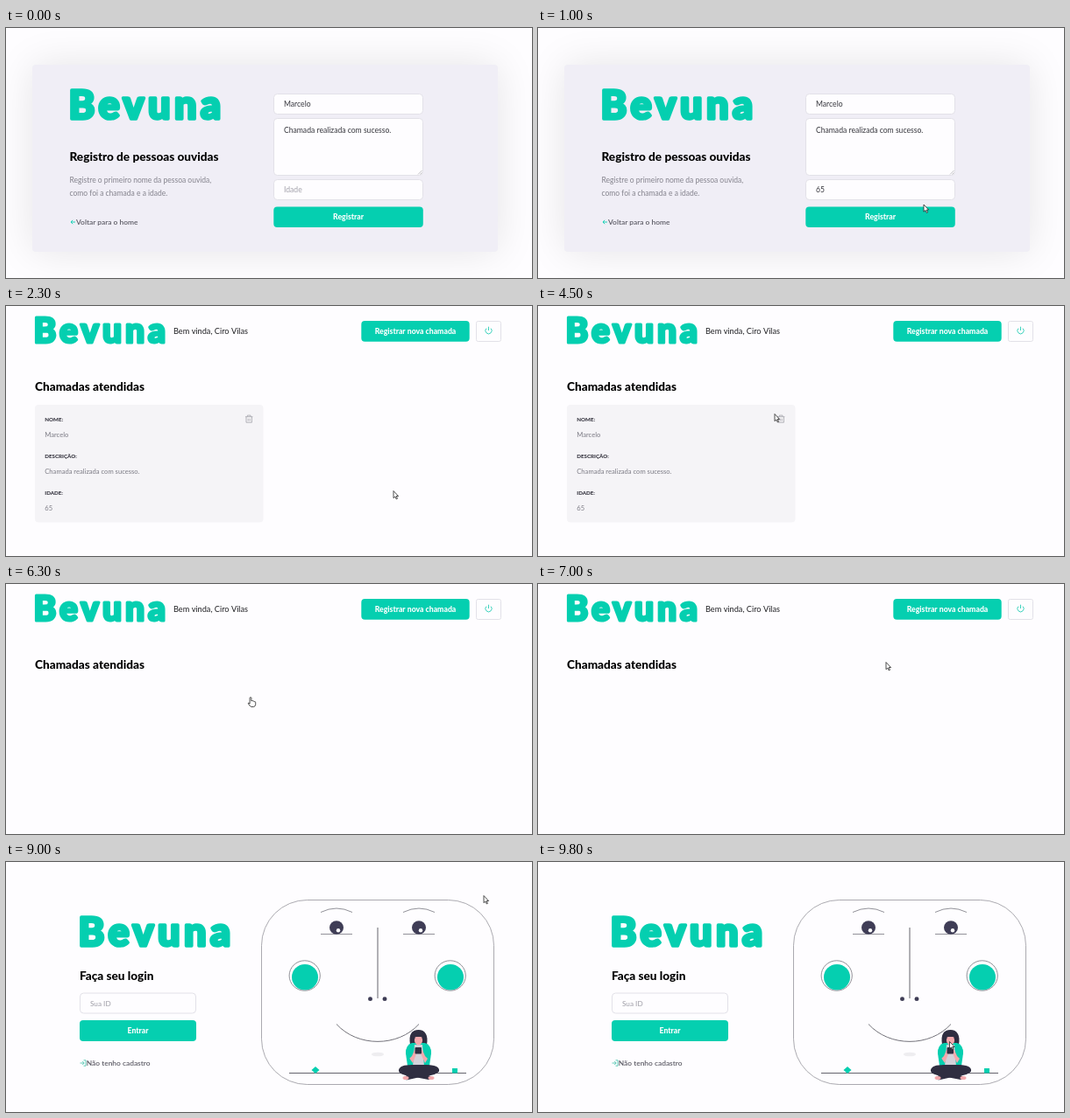
Write an HTML page with a canvas that moves like this. It is 600x286 px and loops after 10 s.

```html
<!DOCTYPE html>
<html lang="pt">
<head>
<meta charset="utf-8">
<title>Registro de chamadas</title>
<style>
  html, body { margin: 0; width: 100%; height: 100%; overflow: hidden; background: #fefdff; }
  canvas { display: block; width: 600px; height: 286px; }
</style>
</head>
<body>
<canvas id="stage"></canvas>
<script>
const W = 600, H = 286, LOOP = 10000;
const GREEN = '#05cfb0', HOVER = '#09b59d', INK = '#000', LINE = '#e2e1e8';
const BRAND = 'Bevuna', PERSON = 'Marcelo', USER = 'Ciro Vilas';
const NOTE = 'Chamada realizada com sucesso.';

const canvas = document.getElementById('stage');
const ctx = canvas.getContext('2d');
const scale = window.devicePixelRatio || 1;
canvas.width = W * scale;
canvas.height = H * scale;

// Pointer stops: [time, x, y, shape]; a missing shape hides it.
const pointer = [
  [0, 0, 0, ''],
  [1000, 440, 202, 'arrow'], [1300, 442, 210, 'arrow'], [1500, 442, 211.5, 'arrow'],
  [2800, 454.5, 119, 'arrow'], [3300, 454.5, 104, 'arrow'], [3500, 454.5, 89.5, 'arrow'],
  [4000, 301.5, 89.5, 'arrow'], [4300, 280, 112, 'arrow'], [4500, 270, 123.5, 'arrow'],
  [4800, 273, 126, 'arrow'], [5000, 279, 129.5, 'hand'],
  [7000, 397, 89.5, 'arrow'], [7300, 424, 84, 'arrow'], [7500, 451.5, 72.5, 'arrow'],
  [7800, 507, 50, 'arrow'], [8000, 546.5, 38.5, 'hand'],
  [9000, 545, 38.5, 'arrow'], [9300, 484, 170, 'arrow'], [9500, 469.5, 205.5, 'arrow']
];

const stepAt = (list, t) => list.filter(s => s[0] <= t).pop();

function text(str, x, y, size, color, weight = 400, align = 'left') {
  ctx.font = `${weight} ${size}px Lato, sans-serif`;
  ctx.textAlign = align;
  ctx.fillStyle = color;
  ctx.fillText(str, x, y);
}

function box(x, y, w, h, r, fill, stroke) {
  ctx.beginPath();
  ctx.roundRect(x, y, w, h, r);
  paint(fill, stroke, 1);
}

function paint(fill, stroke, width = 0.8) {
  if (fill) { ctx.fillStyle = fill; ctx.fill(); }
  if (stroke) { ctx.strokeStyle = stroke; ctx.lineWidth = width; ctx.stroke(); }
}

function shape(d, fill, stroke, width) {
  const path = new Path2D(d);
  if (fill) { ctx.fillStyle = fill; ctx.fill(path); }
  if (stroke) { ctx.strokeStyle = stroke; ctx.lineWidth = width || 0.8; ctx.stroke(path); }
}

function oval(x, y, rx, ry, fill, stroke) {
  ctx.beginPath();
  ctx.ellipse(x, y, rx, ry, 0, 0, Math.PI * 2);
  paint(fill, stroke);
}

// The outline rounds the corners of the heavy letters.
function wordmark(x, y, size) {
  ctx.save();
  ctx.letterSpacing = `${size * 0.1}px`;
  text(BRAND, x, y, size, GREEN, 800);
  ctx.strokeStyle = GREEN;
  ctx.lineWidth = size * 0.08;
  ctx.strokeText(BRAND, x, y);
  ctx.restore();
}

function field(x, y, w, h) {
  box(x + 0.5, y + 0.5, w - 1, h - 1, 4, '#fefdff', LINE);
}

function button(label, x, y, w, h, color = GREEN) {
  box(x, y, w, h, 4, color);
  text(label, x + w / 2, y + h / 2 + 3.2, 8.7, '#fff', 800, 'center');
}

function formPage(t) {
  ctx.save();
  ctx.shadowColor = 'rgba(0,0,0,0.1)';
  ctx.shadowBlur = 46 * scale;
  box(30, 42, 531, 214, 4, '#f0eef6');
  ctx.restore();

  wordmark(71.4, 104.2, 45);
  text('Registro de pessoas ouvidas', 72.5, 152, 13.6, INK, 800);
  text('Registre o primeiro nome da pessoa ouvida,', 72.5, 177, 8.5, '#84838d');
  text('como foi a chamada e a idade.', 72.5, 192, 8.5, '#84838d');
  shape('M79 222H74M76.2 219.8L74 222L76.2 224.2', null, GREEN, 0.9);
  text('Voltar para o home', 80, 225, 8.4, '#5c5b65', 600);

  field(305, 75, 171, 24);
  field(305, 103, 171, 66);
  field(305, 173, 171, 24);
  text(PERSON, 317, 90, 8.6, '#36363d');
  text(NOTE, 317, 119.5, 8.6, '#36363d');
  shape('M470 167.5L474.5 163M472.5 167.5L474.5 165.5', null, '#a5a4aa', 0.7);

  const age = t < 300 ? 'Idade' : t < 500 ? '6' : '65';
  text(age, 317, 188, 8.6, t < 300 ? '#a4a3ac' : '#36363d');
  if (t >= 300 && t < 800) {
    ctx.fillStyle = '#55545c';
    ctx.fillRect(t < 500 ? 322.5 : 327.5, 180, 0.6, 10);
  }
  button('Registrar', 305.3, 204.5, 170.5, 23.5, t < 1300 ? GREEN : t < 1500 ? '#07c2a7' : HOVER);
}

function trash() {
  shape('M273 126.7H281.4M275.4 126.5V125.1H279V126.5M274 126.9V133.2H280.4V126.9'
    + 'M276.2 128.8V131.6M278.2 128.8V131.6', null, '#a3a2aa', 0.8);
}

function homePage(t) {
  wordmark(31.6, 42.3, 39);
  text('Bem vinda, ' + USER, 191, 32.3, 9.2, '#202024');
  button('Registrar nova chamada', 405.3, 17.1, 123.4, 23.6);
  box(536.5, 17.5, 28, 23, 2, null, t >= 8000 ? '#62616a' : LINE);
  ctx.beginPath();
  ctx.arc(550.5, 28.2, 3.6, -Math.PI * 0.25, Math.PI * 1.25);
  paint(null, '#27cdb6', 0.9);
  shape('M550.5 23.7V28', null, '#27cdb6', 0.9);
  text('Chamadas atendidas', 33, 96.7, 13.6, INK, 800);

  if (t >= 6300) return;
  box(33, 113, 260.5, 134.5, 4, '#f5f4f7');
  [['NOME:', PERSON], ['DESCRIÇÃO:', NOTE], ['IDADE:', '65']].forEach(([label, value], i) => {
    const y = 131.5 + i * 42.3;
    text(label, 44.3, y, 6.2, '#33323d', 800);
    text(value, 44.3, y + 18, 7.6, '#7b7a84');
  });
  trash();
}

function reader() {
  const dark = '#2f2e41', skin = '#f3a9ad';
  shape('M461 209C459 197 463 192 470.5 192C478 192 482 198 480 209L477 212H464Z', dark);
  shape('M463 207Q456 209 456 219L458 233H483L485 219Q485 209 478 207Z', GREEN);
  shape('M466 209H475L477 234H464Z', '#d3d2da');
  oval(470.5, 204, 4.6, 5.3, skin);
  shape('M464 204Q465 195 470.5 195Q477 195 477.5 204L475 200H466Z', dark);
  shape('M457 220L464 230L469 217L466 215L463 222L460 214ZM484 220L478 230L472 217L475 215L478 222L481 214Z', skin);
  shape('M456 218Q457 210 462 209L463 222L459 226ZM485 218Q484 210 479 209L478 222L482 226Z', GREEN);
  box(466.5, 212, 7.5, 7.5, 1, dark);
  shape('M463 232Q449 232 448 238Q447 243 461 245L482 249Q487 249 486 246L474 240'
    + 'L481 237L494 240Q494 233 478 232Z', dark);
  shape('M478 232Q495 232 494 239Q492 244 477 245L459 249Q453 250 454 246Z', dark);
  oval(456, 247, 3.5, 2, skin);
  oval(485, 247, 3.5, 2, skin);
}

function face() {
  const stroke = '#77767f', dark = '#3f3d56';
  ctx.beginPath();
  ctx.roundRect(291.5, 43.5, 265, 211, 52);
  paint(null, '#96959c', 0.8);
  for (const x of [377, 471]) {
    shape(`M${x - 18} 57.5Q${x} 48.5 ${x + 18} 57.5M${x - 18} 82.5H${x + 18}`, null, stroke);
    oval(x, 75, 8, 7.8, dark);
    oval(x + 2, 78.3, 2.2, 2.2, '#fff');
  }
  for (const x of [341, 507]) {
    oval(x, 131.7, 15, 14.8, GREEN);
    oval(x - 0.3, 130, 17.6, 17.2, null, stroke);
  }
  shape('M424 75V156', null, '#65646d', 1);
  oval(415.5, 156.7, 2.5, 2.4, dark);
  oval(432, 156.7, 2.5, 2.4, dark);
  shape('M377 185.5C401 212 447 212 471 185.5', null, '#65646d', 0.9);
  oval(424, 220, 7, 2.3, '#eeedf0');
  shape('M323 241.5H525', null, '#65646d', 1);
  shape('M353 234L357.5 238L353 242L348.5 238Z', GREEN);
  box(509, 236, 6, 5.5, 0, GREEN);
  reader();
}

function loginPage() {
  wordmark(82.4, 96.2, 45);
  text('Faça seu login', 84, 134.5, 13.6, INK, 800);
  field(84, 149.5, 133, 24);
  text('Sua ID', 96, 164.5, 8.2, '#9d9ca5');
  button('Entrar', 84, 181, 133, 24);
  shape('M84.5 230H89M87.2 228L89.2 230L87.2 232M88.5 226.8H91V233.2H88.5', null, '#3fbfa9', 0.8);
  text('Não tenho cadastro', 91.8, 233, 8.4, '#5c5b65', 600);
  face();
}

function drawPointer([, x, y, kind]) {
  if (!kind) return;
  ctx.save();
  ctx.translate(x, y);
  if (kind === 'arrow') {
    shape('M0 0V8.2L1.9 6.5L3.2 9.4L4.5 8.8L3.2 6H5.6Z', '#fff', '#222', 0.8);
  } else {
    shape('M-0.9 7.4V1Q-0.9 0.1 0 0.1T0.9 1V4.2Q2.4 3.3 2.8 4.6Q4.1 4 4.4 5.2'
      + 'Q5.7 4.8 5.7 6.1V8.2Q5.4 10.8 3.5 11H0.8Q-0.6 10.7 -2.7 7.3Q-2.8 5.5 -0.9 7.4Z', '#fff', '#222', 0.8);
  }
  ctx.restore();
}

function frame() {
  const t = performance.now() % LOOP;
  ctx.setTransform(scale, 0, 0, scale, 0, 0);
  ctx.lineJoin = 'round';
  ctx.fillStyle = '#fefdff';
  ctx.fillRect(0, 0, W, H);
  if (t < 2300) formPage(t);
  else if (t < 9000) homePage(t);
  else loginPage();
  drawPointer(stepAt(pointer, t));
  requestAnimationFrame(frame);
}
requestAnimationFrame(frame);
</script>
</body>
</html>
```
